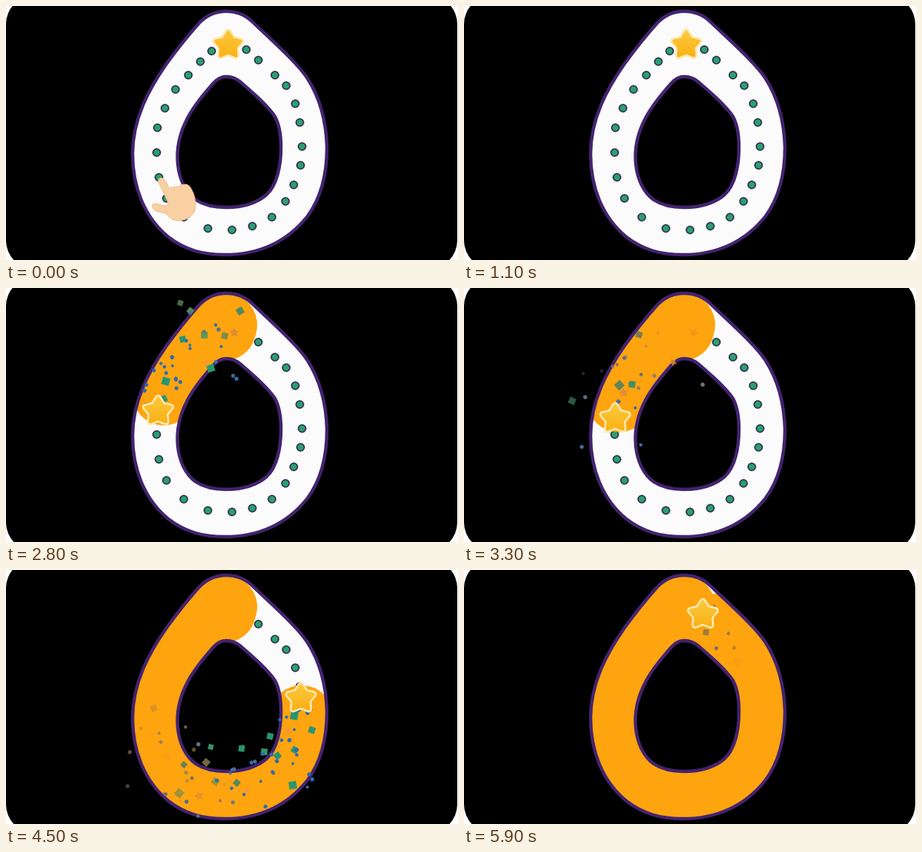
An HTML page with a canvas that plays this animation: 600 px wide and 338 px high, repeating every 6000 ms.

```html
<!DOCTYPE html>
<html lang="en">
<head>
<meta charset="utf-8">
<title>Trace the shape</title>
<style>
html, body { margin: 0; width: 100%; height: 100%; overflow: hidden; background: #fff; }
canvas { display: block; width: 600px; height: 338px; }
</style>
</head>
<body>
<canvas id="stage" width="600" height="338"></canvas>
<script>
const ctx = document.getElementById('stage').getContext('2d');
const LOOP = 6000;
const LAG = 25; // the paint follows the star at this distance

const outer = new Path2D('M292 7C276 7 266 13 257 22C240 41 226 59 213 77C190 110 168 150 168 197C168 240 183 280 215 307C238 325 262 331 290 331C335 331 372 315 400 280C420 253 426 220 426 188C425 152 416 121 400 96C386 75 353 46 327 21C317 11 306 7 292 7Z');
const inner = new Path2D('M293 94C285 94 280 97 275 103C262 118 250 132 241 149C230 170 226 190 228 210C230 230 238 248 252 258C264 266 278 268 292 268C313 268 332 263 346 251C360 238 365 212 365 188C365 170 363 158 357 147C346 131 327 115 311 101C305 96 300 94 293 94Z');
const ring = new Path2D(outer);
ring.addPath(inner);

// Fingertip at 0,0
const hand = new Path2D('M0 3C5 0 9 6 13 16C19 13 23 15 26 13C33 9 39 10 42 16C48 26 49 36 47 46C43 55 33 59 25 59C17 59 14 55 9 50C3 47-5 48-9 42C-11 37-6 35-1 37C5 40 11 40 12 36C9 28 2 15-1 8C-2 5-1 4 0 3Z');

const guide = [
  [295, 52], [273, 60], [258, 74], [242, 92], [225, 111], [211, 136], [201, 162],
  [200, 195], [203, 228], [213, 256], [236, 281], [268, 296], [300, 298],
  [327, 293], [353, 281], [371, 260], [382, 238], [391, 212], [393, 187],
  [390, 155], [384, 130], [372, 106], [357, 92], [335, 72], [319, 58]
];

// Time in ms, distance travelled along the guide
const drag = [[2050, 0], [2400, 65], [2750, 150], [3300, 161], [3700, 272], [4500, 521], [5000, 662]];
const hint = [[0, 213], [950, 640]];

function lerpTable(table, x, from = 0, to = 1) {
  if (x <= table[0][from]) return table[0][to];
  for (let i = 1; i < table.length; i++) {
    const a = table[i - 1], b = table[i];
    if (x <= b[from]) return a[to] + (b[to] - a[to]) * (x - a[from]) / (b[from] - a[from]);
  }
  return table[table.length - 1][to];
}

// Smooth the guide and sample it once per pixel
function sample(points) {
  let d = `M${points[0]}`;
  for (let i = 1; i < points.length - 1; i++) {
    const [x, y] = points[i], [nx, ny] = points[i + 1];
    d += `Q${x} ${y} ${(x + nx) / 2} ${(y + ny) / 2}`;
  }
  d += `L${points[points.length - 1]}`;
  const path = document.createElementNS('http://www.w3.org/2000/svg', 'path');
  path.setAttribute('d', d);
  const out = [];
  for (let s = 0; s <= path.getTotalLength(); s++) {
    const p = path.getPointAtLength(s);
    out.push([p.x, p.y]);
  }
  return out;
}
const track = sample([...guide, [316, 60]]);

function at(s) {
  const end = track.length - 1;
  s = Math.max(0, Math.min(end, s));
  const i = Math.min(end - 1, Math.floor(s)), k = s - i;
  return [0, 1].map(c => track[i][c] + (track[i + 1][c] - track[i][c]) * k);
}

let seed = 11;
function rnd() {
  seed = (seed * 16807) % 2147483647;
  return seed / 2147483647;
}

const GREEN = [38, 150, 112], BLUE = [44, 108, 178], ORANGE = [248, 152, 48], FADED = [168, 112, 62];
const COUNT = 170;
const bits = Array.from({ length: COUNT }, (_, i) => {
  const s = i / COUNT * 655, kind = rnd();
  return {
    from: at(s),
    born: lerpTable(drag, s, 1, 0),
    life: 700 + 650 * rnd(),
    angle: rnd() * Math.PI * 2,
    reach: 10 + 75 * rnd(),
    spin: rnd() * 3,
    shape: kind < 0.28 ? 'square' : kind < 0.36 ? 'star' : 'dot',
    size: 0.8 + 0.4 * rnd()
  };
});

function starPath(R, r) {
  ctx.beginPath();
  for (let i = 0; i < 10; i++) {
    const a = -Math.PI / 2 + i * Math.PI / 5, d = i % 2 ? r : R;
    ctx.lineTo(d * Math.cos(a), d * Math.sin(a));
  }
  ctx.closePath();
}

function drawBit(b, t) {
  const age = t - b.born;
  if (age < 0 || age > b.life) return;
  const d = b.reach * (1 - Math.exp(-age / 280));
  const base = b.shape === 'square' ? GREEN : b.shape === 'star' ? ORANGE : BLUE;
  const k = Math.max(0, Math.min(1, (age - 400) / 800));
  ctx.save();
  ctx.translate(b.from[0] + d * Math.cos(b.angle), b.from[1] + d * Math.sin(b.angle));
  ctx.rotate(b.spin + age / 900);
  ctx.scale(b.size, b.size);
  ctx.globalAlpha = Math.min(1, (b.life - age) / 300);
  ctx.fillStyle = `rgb(${base.map((c, i) => Math.round(c + (FADED[i] - c) * k))})`;
  if (b.shape === 'square') {
    ctx.fillRect(-4.3, -4.3, 8.6, 8.6);
  } else if (b.shape === 'star') {
    starPath(6, 3);
    ctx.fill();
  } else {
    ctx.beginPath();
    ctx.arc(0, 0, 2.4, 0, Math.PI * 2);
    ctx.fill();
  }
  ctx.restore();
}

function drawStar([x, y]) {
  ctx.save();
  ctx.translate(x, y);
  ctx.lineJoin = 'round';
  starPath(17.5, 10);
  ctx.strokeStyle = '#fdeab4';
  ctx.lineWidth = 9;
  ctx.stroke();
  const gold = ctx.createLinearGradient(0, -20, 0, 18);
  gold.addColorStop(0, '#fcc93f');
  gold.addColorStop(1, '#f9b012');
  ctx.strokeStyle = ctx.fillStyle = gold;
  ctx.lineWidth = 4;
  ctx.stroke();
  ctx.fill();
  ctx.restore();
}

function drawPaint(s) {
  ctx.save();
  ctx.clip(ring, 'evenodd');
  ctx.beginPath();
  ctx.moveTo(291, 49);
  const end = Math.max(6, s - LAG);
  for (let d = 6; d < end; d += 4) ctx.lineTo(...at(d));
  ctx.lineTo(...at(end));
  ctx.strokeStyle = '#fea40f';
  ctx.lineWidth = 85;
  ctx.lineCap = ctx.lineJoin = 'round';
  ctx.stroke();
  ctx.restore();
}

function drawHand(t) {
  const alpha = Math.min(1, (1000 - t) / 150);
  if (alpha <= 0) return;
  const [x, y] = at(lerpTable(hint, t));
  ctx.save();
  ctx.translate(x, y + 1);
  ctx.globalAlpha = alpha;
  ctx.fillStyle = '#f8d0a2';
  ctx.fill(hand);
  ctx.strokeStyle = '#edbd8c';
  ctx.lineWidth = 1;
  ctx.stroke(hand);
  ctx.restore();
}

function draw(t) {
  ctx.fillStyle = '#fff';
  ctx.fillRect(0, 0, 600, 338);
  ctx.fillStyle = '#000';
  ctx.beginPath();
  ctx.roundRect(0, -14, 599, 364, 38);
  ctx.fill();

  ctx.fillStyle = '#fbfbfb';
  ctx.fill(ring, 'evenodd');

  ctx.fillStyle = '#2aa06c';
  ctx.strokeStyle = '#2d2c50';
  ctx.lineWidth = 1.8;
  for (const [x, y] of guide.slice(1)) {
    ctx.beginPath();
    ctx.arc(x, y, 4.9, 0, Math.PI * 2);
    ctx.fill();
    ctx.stroke();
  }

  const s = lerpTable(drag, t);
  if (t >= drag[0][0]) drawPaint(s);

  ctx.strokeStyle = '#43236e';
  ctx.lineWidth = 4.4;
  ctx.stroke(ring);

  for (const b of bits) drawBit(b, t);
  drawStar(at(s));
  drawHand(t);
}

const start = performance.now();
function tick() {
  const t = (performance.now() - start) % LOOP;
  draw(Math.floor(t / 100) * 100);
  requestAnimationFrame(tick);
}
tick();
</script>
</body>
</html>
```
